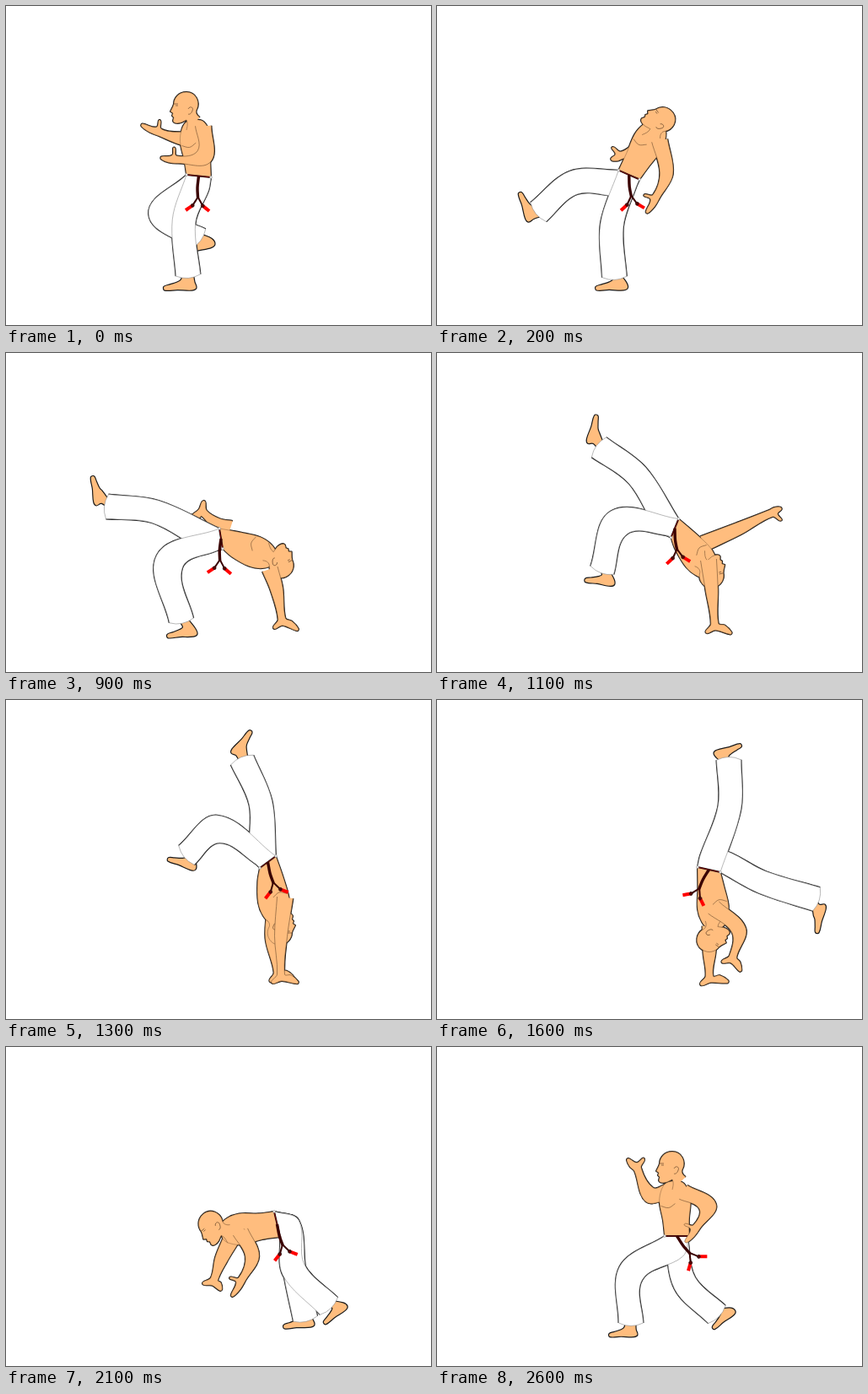
Write an HTML page with a canvas that moves like this. It is 504 px wide and 378 px high and loops after 3600 ms.

```html
<!DOCTYPE html>
<html lang="en">
<head>
<meta charset="utf-8">
<title>Cartwheel kick</title>
<style>
  html, body { margin: 0; width: 100%; height: 100%; overflow: hidden; background: #fff; }
  canvas { display: block; }
</style>
</head>
<body>
<canvas id="stage" width="504" height="378"></canvas>
<script>
const ctx = document.getElementById('stage').getContext('2d');
const SKIN = '#ffbd7e', INK = '#1a1a1a', THIN = '#6b4a2c', LOOP = 3600;

// Joints of the key poses, by step.
// body: belt front, belt back, neck; legs: knee, hem, heel, toe;
// arms: shoulder, elbow, wrist, fingertip; head: x, y, turn; sway: swing of the cord.
const poses = {
  0: {
    body: [214,200, 243,203, 223,136], head: [212,120,0], sway: [2],
    kick: [188,246, 228,276, 248,282, 210,292], stand: [211,255, 216,319, 226,334, 187,334],
    near: [234,142, 235,178, 203,182, 184,180], far: [220,155, 208,157, 183,150, 161,141]
  },
  3: {
    body: [216,192, 238,206, 279,151], head: [290,143,82], sway: [-10],
    kick: [160,185, 104,173, 90,170, 107,139], stand: [206,262, 208,322, 227,333, 189,333],
    near: [279,168, 291,208, 294,236, 295,260], far: [265,168, 250,178, 240,186, 234,192]
  },
  5: {
    body: [253,208, 257,232, 317,244], head: [326,248,152], sway: [3],
    kick: [177,188, 120,182, 107,181, 103,146], stand: [194,247, 208,317, 227,333, 191,335],
    near: [313,256, 321,280, 327,315, 346,328], far: [266,208, 250,203, 235,190, 219,195]
  },
  7: { far: [316,226, 358,208, 396,190, 408,184] },
  9: {
    body: [320,185, 301,199, 321,262], head: [326,272,180], sway: [-15],
    kick: [302,122, 280,71, 267,63, 291,37], stand: [252,153, 214,184, 225,201, 192,188],
    near: [331,234, 326,280, 326,325, 346,335], far: [320,240, 315,282, 322,322, 340,328]
  },
  12: {
    body: [336,204, 309,198, 330,270], head: [326,282,215], sway: [27],
    kick: [386,216, 450,236, 460,242, 450,276], stand: [347,127, 346,71, 328,63, 361,54],
    near: [328,246, 358,273, 351,304, 360,321], far: [324,268, 323,300, 323,327, 345,334]
  },
  17: {
    body: [325,225, 318,195, 256,219], head: [244,213,320], sway: [-15],
    kick: [342,264, 355,322, 366,329, 329,331], stand: [341,264, 383,307, 405,307, 377,327],
    near: [278,219, 292,248, 280,275, 268,295], far: [266,230, 255,252, 247,275, 255,288]
  },
  20: {
    body: [270,224, 299,224, 281,160], head: [277,142,360], sway: [-37],
    kick: [294,280, 332,317, 354,313, 327,333], stand: [230,268, 230,327, 238,341, 204,341],
    near: [292,172, 321,189, 308,213, 295,231], far: [272,172, 252,175, 238,145, 226,133]
  }
};

const HEAD = new Path2D('M18 12C13 9 13 5 14 3C19-6 13-18 2-18C-8-18-13-10-13-4L-14-1L-17 5L-14 7L-15 10L-13 12L-14 16C-13 20-7 19-4 18L2 15C4 19 3 23 2 27');
const FACE = new Path2D('M4 2C6-2 11 0 9 4C8 7 6 9 4 8M-13-4h5M-11-2h3');
// Distance from the heel along the sole, height above it
const FOOT = [[18,10], [22,7], [31,4], [38,1.5], [37,-3], [22,-2.5], [5,-3], [0,0], [2,7]];
// Place along the spine, half width
const TORSO = [[.3,15.5], [.65,18.5], [.88,15], [1,8]];

const rad = deg => deg * Math.PI / 180;
const lerp = (a, b, k) => a + (b - a) * k;
const mix = (p, q, k) => p.map((v, i) => lerp(v, q[i], k));
const mid = (p, q) => mix(p, q, .5);
const along = (p, d, len) => [p[0] + d[0] * len, p[1] + d[1] * len];
const polar = (p, angle, len) => along(p, [Math.cos(angle), Math.sin(angle)], len);
const perp = ([x, y]) => [-y, x];
const heading = (a, b) => Math.atan2(b[1] - a[1], b[0] - a[0]);
const distance = (a, b) => Math.hypot(b[0] - a[0], b[1] - a[1]);
const unit = (a, b) => polar([0, 0], heading(a, b), 1);
const pairs = list => list.flatMap((v, i) => i % 2 ? [] : [[v, list[i + 1]]]);

function hipOf([front, back]) {
  return along(mid(front, back), perp(unit(front, back)), 12);
}

function around(track, pos) {
  const i = Math.min(track.findLastIndex(key => key.step <= pos), track.length - 2);
  const a = track[i], b = track[i + 1];
  return [a, b, (pos - a.step) / (b.step - a.step)];
}

const keysOf = name => Object.keys(poses).filter(s => poses[s][name]);

function plain(name) {
  const track = keysOf(name).map(s => ({ step: +s, v: poses[s][name] }));
  return pos => {
    const [a, b, k] = around(track, pos);
    return mix(a.v, b.v, k);
  };
}

// Bones turn the short way from key to key while their lengths change evenly
function chain(name, isLeg) {
  let last = null;
  const track = keysOf(name).map(s => {
    const p = pairs(poses[s][name]);
    if (isLeg) p.unshift(hipOf(pairs(poses[s].body)));
    const bones = p.slice(1).map((q, i) => {
      let angle = heading(p[i], q);
      if (last) angle -= Math.round((angle - last[i][0]) / (2 * Math.PI)) * 2 * Math.PI;
      return [angle, distance(p[i], q)];
    });
    last = bones;
    return { step: +s, root: p[0], bones };
  });
  return pos => {
    const [a, b, k] = around(track, pos), p = [mix(a.root, b.root, k)];
    a.bones.forEach((bone, i) => p.push(polar(p[i], ...mix(bone, b.bones[i], k))));
    return p;
  };
}

const rig = {
  body: chain('body'), near: chain('near'), far: chain('far'),
  kick: chain('kick', true), stand: chain('stand', true),
  head: plain('head'), sway: plain('sway')
};

// Both edges of a bent limb, with mitred joints
function edges(p, widths) {
  const sides = [1, -1].map(side => p.map((q, i) => {
    const into = heading(p[Math.max(i - 1, 0)], p[Math.max(i, 1)]);
    const out = i < p.length - 1 ? heading(q, p[i + 1]) : into;
    const half = Math.atan2(Math.sin(out - into), Math.cos(out - into)) / 2;
    const mitre = Math.min(1.4, 1 / Math.cos(half));
    return polar(q, into + half + side * Math.PI / 2, widths[i] * mitre);
  }));
  return sides;
}

function curve(path, p, join) {
  path[join ? 'lineTo' : 'moveTo'](...p[0]);
  const tangent = i => unit(p[Math.max(i - 1, 0)], p[Math.min(i + 1, p.length - 1)]);
  for (let i = 0; i < p.length - 1; i++) {
    const len = distance(p[i], p[i + 1]) * .33;
    path.bezierCurveTo(...along(p[i], tangent(i), len), ...along(p[i + 1], tangent(i + 1), -len), ...p[i + 1]);
  }
  return path;
}
const outline = p => curve(new Path2D(), p);

function torsoPath([front, back, neck]) {
  const waist = mid(front, back), side = perp(unit(waist, neck));
  const edge = sign => TORSO.map(([t, w]) => along(mix(waist, neck, t), side, sign * w));
  return outline([front, ...edge(-1), ...edge(1).reverse(), back]);
}

function chestLine([front, back, neck]) {
  const waist = mid(front, back), side = perp(unit(waist, neck));
  return outline([[.57,-17], [.53,-8], [.6,0]].map(([t, w]) => along(mix(waist, neck, t), side, w)));
}

function armPath([shoulder, elbow, wrist, tip]) {
  const [inner, outer] = edges([shoulder, elbow, wrist], [9.5, 7.5, 4.5]);
  const hand = heading(wrist, tip), bend = hand - heading(elbow, wrist);
  const spread = rad(60) + Math.abs(Math.atan2(Math.sin(bend), Math.cos(bend))) * .8;
  const side = perp(unit(wrist, tip));
  return outline([
    ...inner, polar(wrist, hand + spread, 15), polar(wrist, hand + spread / 2, 8),
    along(tip, side, 1.5), along(tip, side, -1.5),
    along(mid(wrist, tip), side, -4.5), ...outer.reverse()
  ]);
}

function footPath(hem, heel, toe) {
  const sole = unit(heel, toe), up = perp(sole), size = distance(heel, toe) / 38;
  const place = (p, u, h) => along(along(p, sole, u), up, h);
  return outline([
    place(hem, 6, 4), ...FOOT.map(([u, h]) => place(heel, u * size, h * size)), place(hem, -6, 4)
  ]);
}

function legPaths([hip, knee, hem, heel, toe], [beltFront, beltBack]) {
  const [front, back] = edges([hip, knee, hem], [14, 13.5, 14.5]);
  front[0] = beltFront;
  back.unshift(beltBack);
  back.reverse();
  const seams = outline(front);
  curve(seams, back);
  const cloth = outline(front);
  cloth.quadraticCurveTo(...along(hem, unit(knee, hem), 7), ...back[0]);
  curve(cloth, back, true);
  return { seams, cloth, foot: footPath(hem, heel, toe) };
}

function stroke(path, color, width) {
  ctx.strokeStyle = color;
  ctx.lineWidth = width;
  ctx.stroke(path);
}
function paint(path, fill, line, width) {
  ctx.fillStyle = fill;
  ctx.fill(path);
  stroke(path, line, width);
}
function moved([x, y], deg, drawPart) {
  ctx.save();
  ctx.translate(x, y);
  ctx.rotate(rad(deg));
  drawPart();
  ctx.restore();
}
function dot([x, y], r, fill, line) {
  const path = new Path2D();
  path.arc(x, y, r, 0, 7);
  paint(path, fill, line, .6);
}

function drawCord(front, back, sway) {
  const belt = outline([front, back]);
  stroke(belt, INK, 2);
  stroke(belt, '#7a0000', 1);
  [front, back].forEach(p => dot(p, 1.4, '#fff', '#888'));
  moved(mid(front, back), sway, () => {
    stroke(outline([[0, 0], [-1, 14], [0, 26]]), '#3a0000', 3.4);
    for (const side of [-1, 1]) {
      const knot = [side * 6, 35];
      stroke(outline([[0, 25], knot]), '#3a0000', 2);
      stroke(outline([knot, [side * 14, 41]]), '#f00', 4);
      dot(knot, 2, '#5a0000', INK);
    }
  });
}

function draw(pos) {
  const now = {};
  for (const name in rig) now[name] = rig[name](pos);
  const [front, back] = now.body;
  const body = torsoPath(now.body), near = armPath(now.near), far = armPath(now.far);
  const legs = [now.kick, now.stand].map(leg => legPaths(leg, now.body));
  const inHead = drawPart => moved(now.head, now.head[2], drawPart);

  ctx.fillStyle = '#fff';
  ctx.fillRect(0, 0, 504, 378);
  ctx.lineJoin = 'round';

  // Heavy silhouette first; the fills leave only fine lines inside it
  [body, near, far].forEach(path => stroke(path, INK, 2));
  inHead(() => stroke(HEAD, INK, 2));
  paint(far, SKIN, THIN, .5);

  legs.forEach(leg => paint(leg.foot, SKIN, INK, 1.2));
  legs.forEach(leg => stroke(leg.seams, INK, 2));
  legs.forEach(leg => paint(leg.cloth, '#fff', '#888', .6));

  paint(body, SKIN, THIN, .4);
  stroke(chestLine(now.body), THIN, .6);
  inHead(() => {
    paint(HEAD, SKIN, THIN, .5);
    stroke(FACE, THIN, .7);
  });
  drawCord(front, back, now.sway[0]);
  paint(near, SKIN, THIN, .6);
}

// Whole steps of 100 ms with three rests; the last steps slow down
function poseAt(t) {
  let step = t < 700 ? Math.min(2, Math.floor(t / 100)) : Math.min(18, Math.floor(t / 100) - 4);
  if (t >= 2400) step = t < 2600 ? 19 : 20;
  const rest = (20 - step) / 3;
  return step < 17 ? step : 20 - 3 * rest * rest;
}

const begin = performance.now();
function tick() {
  draw(poseAt((performance.now() - begin) % LOOP));
  requestAnimationFrame(tick);
}
tick();
</script>
</body>
</html>
```
